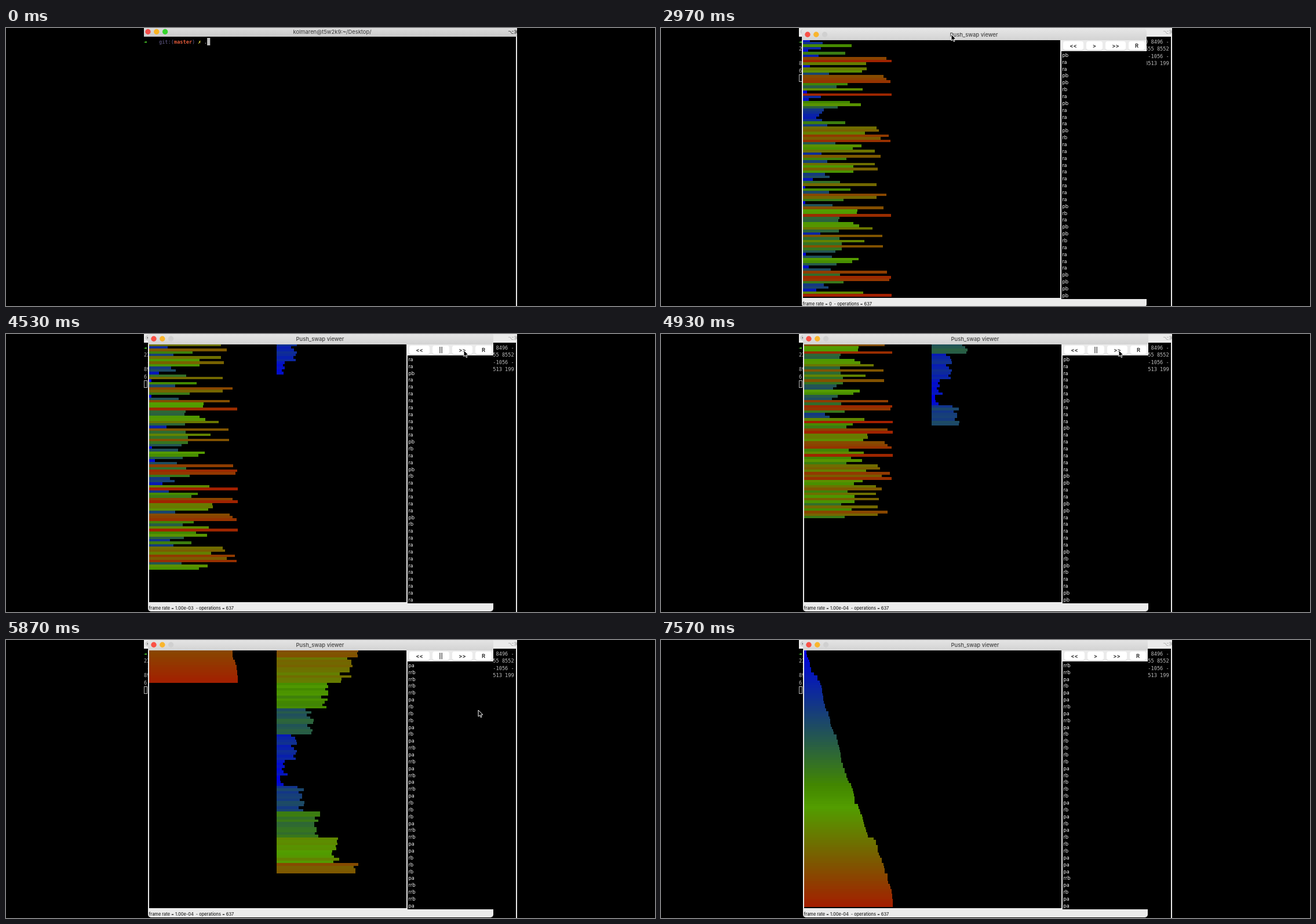
An HTML page with a canvas that plays this animation: 1120 px wide and 480 px high, repeating every 7760 ms.

```html
<!DOCTYPE html>
<html lang="en">
<head>
<meta charset="utf-8">
<title>Push_swap viewer</title>
<style>
html, body { margin: 0; width: 100%; height: 100%; overflow: hidden; background: #000; }
canvas { display: block; }
</style>
</head>
<body>
<canvas id="stage" width="1120" height="480"></canvas>
<script>
const ctx = document.getElementById('stage').getContext('2d');
const LOOP = 7760;
const MONO = '8.63px "DejaVu Sans Mono", monospace';
const sans = (size, weight = 400) => `${weight} ${size}px Inter, "DejaVu Sans", sans-serif`;

// The command line on screen, which is also the data being sorted
const INPUT = '-8029 -5441 573 -5730 -8424 -751 -6191 7693 8793 3604 -8067 3727 2766 -4060 7173 7750 8496 ' +
  '-233 -2495 2809 -8626 8773 -5725 -8212 215 2479 -2304 -5207 -5547 -6065 -6727 -5527 -743 -4435 5709 ' +
  '6211 3320 8242 6555 8552 -2736 2575 853 5282 -5657 6567 -534 -4392 5379 945 5991 898 -4959 -4007 -7439 ' +
  '-1845 5716 -8966 374 -4036 7684 5719 -1056 -8945 -3325 7157 1802 1623 8689 -1970 -2141 983 2062 4877 ' +
  '-2099 -5833 6880 -1878 3190 -1488 7004 -1451 -2760 -8830 -3513 1996 676 -2506 -8250 -3748 7829 -1863 ' +
  '8719 8259 -1065 -5103 -4151 -6759 2965 8799';
const COMMAND = './pyviz.py ' + INPUT;
const values = INPUT.split(' ').map(Number);
const sorted = [...values].sort((p, q) => p - q);
const ranks = values.map(v => sorted.indexOf(v));

// Two stacks and the moves between them
const moves = {
  pa: (a, b) => a.unshift(b.shift()),
  pb: (a, b) => b.unshift(a.shift()),
  ra: a => a.push(a.shift()),
  rb: (a, b) => b.push(b.shift()),
  rrb: (a, b) => b.unshift(b.pop())
};

function solve() {
  const a = [...ranks], b = [], ops = [];
  const go = op => { ops.push(op); moves[op](a, b); };
  for (let high = 20; high <= 100; high += 20) {
    while (b.length < high) {
      const top = a[0];
      if (top >= high) { go('ra'); continue; }
      go('pb');
      if (top < high - 10 && b.length > 1) go('rb');
    }
  }
  while (b.length) {
    const max = b.length - 1;
    const turn = b.indexOf(max) <= b.length / 2 ? 'rb' : 'rrb';
    while (b[0] !== max) go(turn);
    go('pa');
  }
  return ops;
}

const ops = solve();
let pushed = 0;
const thirteenth = ops.findIndex(op => op === 'pa' && ++pushed === 13) + 1;

function stacksAfter(n) {
  const a = [...ranks], b = [];
  for (let i = 0; i < n; i++) moves[ops[i]](a, b);
  return [a, b];
}

// Share of the span from start to end that has passed, 0 to 1
const part = (t, start, end) => Math.min(1, Math.max(0, (t - start) / (end - start)));

const START = 4066, FASTER = 4533, FASTEST = 4700, DONE = 7000;

function opsDone(t) {
  return Math.floor(47 * part(t, START, FASTER) + 119 * part(t, FASTER, 4933) +
    (thirteenth - 166) * part(t, 4933, 5866) + (ops.length - thirteenth) * part(t, 5866, DONE));
}

function windowOffset(t) {
  const pull = 1 - part(t, 2760, 2960), settle = 1 - part(t, 3060, 3160);
  return [-5 * pull - 2 * settle, 11 * pull + 3 * settle];
}

// Blue falls to green at the middle, then green gives way to red
function color(rank) {
  const x = rank / 100;
  const red = 165 * x ** 1.4;
  const green = x < 0.61 ? 258 * x : 157 - 330 * (x - 0.61);
  const blue = Math.max(0, 225 - 430 * x);
  return `rgb(${[red, green, blue].map(Math.round)})`;
}

function rect(x, y, w, h, fill) {
  ctx.fillStyle = fill;
  ctx.fillRect(x, y, w, h);
}

function round(x, y, w, h, r, fill) {
  ctx.fillStyle = fill;
  ctx.beginPath();
  ctx.roundRect(x, y, w, h, r);
  ctx.fill();
}

function text(str, x, y, font, fill, align = 'left') {
  ctx.font = font;
  ctx.fillStyle = fill;
  ctx.textAlign = align;
  ctx.fillText(str, x, y);
}

function shade(y, h, top, bottom) {
  const g = ctx.createLinearGradient(0, y, 0, y + h);
  g.addColorStop(0, top);
  g.addColorStop(1, bottom);
  return g;
}

function lights(x, y, fills) {
  fills.forEach((fill, i) => round(x + i * 14.8 - 4.7, y - 4.7, 9.4, 9.4, 4.7, fill));
}

function typed(t) {
  if (t >= 1300) return COMMAND;
  const keys = 1 + 2 * part(t, 30, 330) + 8 * part(t, 570, 730);
  return COMMAND.slice(0, Math.floor(keys));
}

function terminal(t) {
  const running = t >= 1670, active = t < 1900;
  ctx.save();
  ctx.beginPath();
  ctx.rect(238, 0, 644, 480);
  ctx.clip();
  rect(238, 0, 644, 15, active ? shade(0, 15, '#dcdcdc', '#cacaca') : '#ebebeb');
  lights(245, 6.5, active ? ['#f24c48', '#f9b321', '#35d52c'] : Array(3).fill('#d0d0d0'));
  if (!active) round(243.7, 5.2, 2.6, 2.6, 1.3, '#555');
  const ink = active ? '#363636' : '#a5a5a5';
  const title = running ? COMMAND.slice(0, 75) : 'kolmaren@t5w2k9:~/Desktop/';
  text(title, 563, 10, sans(running ? 9.1 : 9.4), ink, 'center');
  text('⌥⌘1', 866, 10, '9px "DejaVu Sans", sans-serif', ink);

  const cell = 5.195, row = i => 26.7 + i * 12.5;
  const put = (str, col, fill, bold) => text(str, 238 + col * cell, row(0), (bold ? 'bold ' : '') + MONO, fill);
  put('➜', 0, '#5cff35', true);
  put('git:(', 5, '#6a6295');
  put('master', 10, '#e05a3a', true);
  put(')', 16, '#6a6295');
  put('✗', 18, '#f2f04c', true);
  const line = ' '.repeat(20) + typed(t);
  const ends = Math.ceil(line.length / 123);
  for (let i = 0; i < ends; i++) {
    text(line.slice(i * 123, i * 123 + 123), 238, row(i), MONO, '#bdbdbd');
  }
  const col = running ? 0 : line.length % 123;
  const y = row(running ? ends : ends - 1) - 9.7;
  if (active) {
    rect(238 + col * cell, y, 5.2, 13, '#bbb');
  } else {
    ctx.strokeStyle = '#b5b5b5';
    ctx.lineWidth = 1;
    ctx.strokeRect(238.5, Math.round(y) + 0.5, 5, 12);
  }
  rect(880, 15, 2, 465, '#ebebeb');
  ctx.restore();
}

function bars(stack, x) {
  stack.forEach((rank, i) => {
    // whole pixels keep neighbouring bars free of seams
    const y = Math.round(16.2 + i * 4.445), next = Math.round(16.2 + (i + 1) * 4.445);
    rect(x, y, Math.round(6 + (sorted[rank] - sorted[0]) * 0.00839), next - y, color(rank));
  });
}

function buttons(playing) {
  let x = 696;
  for (const label of ['<<', playing ? '||' : '>', '>>', 'R']) {
    const w = label.length > 1 && label !== '||' ? 35 : label === '||' ? 29 : 28;
    round(x, 20.5, w, 15.5, 3.5, '#cfcfcf');
    round(x, 20, w, 15, 3.5, '#fff');
    text(label, x + w / 2, 31.3, sans(9.3, 600), '#222', 'center');
    x += w + 5;
  }
}

function viewer(t) {
  const n = opsDone(t);
  const playing = t >= START && n < ops.length;
  const right = playing ? 841 : 840;
  const [dx, dy] = windowOffset(t);
  ctx.save();
  ctx.translate(Math.round(dx), Math.round(dy));

  round(245, -2, right - 245, 481, 5, '#ebebeb');
  round(245, -2, right - 245, 20, [5, 5, 0, 0], shade(-2, 20, '#e6e6e6', '#d3d3d3'));
  lights(255, 8.3, ['#f95146', '#f9b52d', '#d0d0d0']);
  text('Push_swap viewer', 542, 11.8, sans(9.4, 500), '#444', 'center');

  rect(247, 18, 444, 445, '#000');
  rect(693, 37, right - 693, 428, '#000');
  ctx.save();
  ctx.beginPath();
  ctx.rect(247, 18, 444, 445);
  ctx.clip();
  const [a, b] = stacksAfter(n);
  bars(a, 245);
  bars(b, 467);
  ctx.restore();
  buttons(playing);

  const first = Math.min(Math.max(0, n - 1), ops.length - 36);
  for (let i = 0; i < 36; i++) {
    text(ops[first + i], 694.3, 46.8 + i * 11.86, sans(8.8), '#f2f2f2');
  }
  const rate = t < START ? '0' : t < FASTER ? '1.00e-02' : t < FASTEST ? '1.00e-03' : '1.00e-04';
  text(`frame rate = ${rate}  - operations = 637`, 246.5, 475.6, sans(7.4, 500), '#222');
  ctx.restore();
}

function mouse(t) {
  const [dx, dy] = windowOffset(t);
  let x = 503 + dx, y = 8 + dy;
  const go = (start, end, toX, toY) => {
    const f = part(t, start, end);
    x += (toX - x) * f;
    y += (toY - y) * f;
  };
  go(3500, 4000, 757, 27); // play
  go(4366, FASTER, 790, 28); // faster
  go(5066, 5866, 815, 121);
  go(5866, 6400, 850, 182);
  go(7170, 7540, 790, 26);

  ctx.save();
  ctx.translate(x, y);
  const arrow = new Path2D('M0 0V11L2.6 8.8 4.3 12.6 6 11.8 4.4 8.2 7.8 8Z');
  ctx.fillStyle = '#000';
  ctx.strokeStyle = '#fff';
  ctx.lineWidth = 1;
  ctx.fill(arrow);
  ctx.stroke(arrow);
  ctx.restore();
}

function draw(now) {
  const ms = now % LOOP;
  const t = Math.floor((ms + 5) * 0.03) / 0.03; // thirty pictures a second
  rect(0, 0, 1120, 480, '#000');
  terminal(t);
  if (t >= 2300) {
    viewer(t);
    if (t < 7550) mouse(t);
  }
  requestAnimationFrame(draw);
}
requestAnimationFrame(draw);
</script>
</body>
</html>
```
